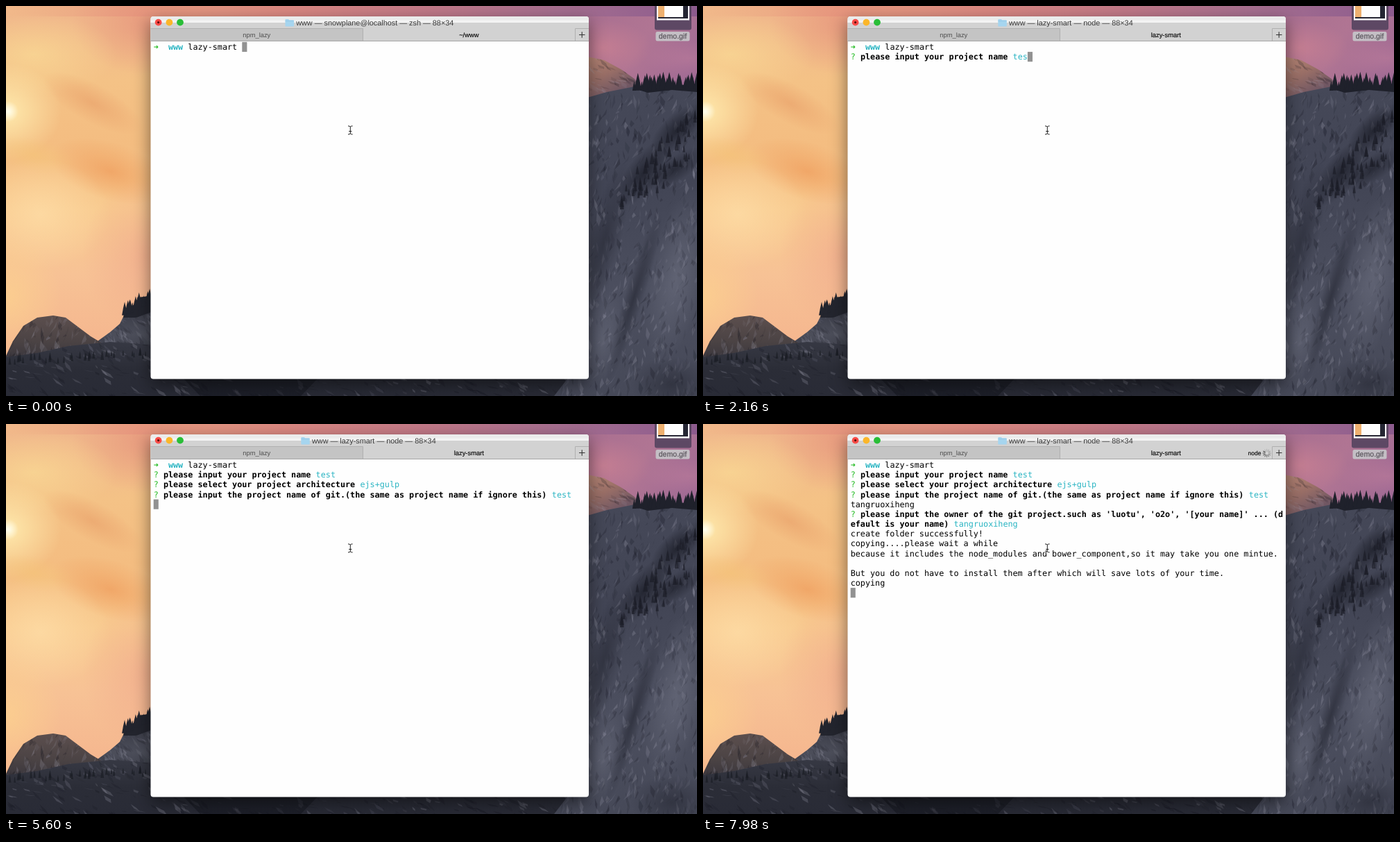
Animation, 996 px wide and 562 px high, one loop 8 s. Source, as an HTML page with a canvas:

```html
<!DOCTYPE html>
<html lang="en">
<head>
<meta charset="utf-8">
<title>Terminal session</title>
<style>
  html, body { margin: 0; width: 100%; height: 100%; overflow: hidden; background: #2b2d38; }
  canvas, svg { position: absolute; left: 0; top: 0; width: 996px; height: 562px; display: block; }
  text { white-space: pre; text-rendering: geometricPrecision; }
  .ui { font-family: "Liberation Sans", Arial, sans-serif; }
  .title { font-size: 10.85px; fill: #3c3c3c; }
  .tab { font-size: 9.35px; text-anchor: middle; }
  .active { fill: #111; stroke: #111; stroke-width: .2px; }
  #term { font: 11.774px "DejaVu Sans Mono", "DejaVu Sans", monospace; fill: #000; }
  #term .b { font-weight: bold; }
  #term .g { fill: #25bc24; }
  #term .c { fill: #2bb5c3; }
  #term .d { fill: #a2a2a2; }
  .shadow { filter: drop-shadow(0 8px 12px rgba(0, 0, 0, .5)); }
</style>
</head>
<body>
<canvas id="wall" width="996" height="562"></canvas>
<svg id="stage" viewBox="0 0 996 562">
  <defs>
    <clipPath id="frame"><rect x="208.5" y="15" width="631.5" height="522.5" rx="4"/></clipPath>
    <g id="folder" fill="#a6d5ef">
      <path d="M0 1.5q0-1 1-1h3.6l1.2 1.3h5.7q1 0 1 1V10q0 1-1 1H1q-1 0-1-1z"/>
      <path d="M0 3.2h12.5" stroke="#8fc5e4" stroke-width=".7"/>
    </g>
    <path id="beam" d="M493.4 172.9q2.2 0 2.9 1.2.7-1.2 2.9-1.2M493.4 185q2.2 0 2.9-1.2.7 1.2 2.9 1.2M496.3 174v9.8M494.6 180.6h3.4" fill="none" stroke-linecap="round"/>
  </defs>

  <!-- desktop icon -->
  <rect x="935" y="-8" width="53" height="42.5" rx="3" fill="#5d4864"/>
  <rect x="938" y="-4" width="47" height="24.5" fill="#fff"/>
  <rect x="940" y="-4" width="43" height="22" fill="#252633"/>
  <path d="M940-4h9v20h-9z" fill="#eeb06f"/>
  <path d="M949-4h27v20h-27z" fill="#fdfdfd"/>
  <rect x="936.5" y="37" width="49" height="13.5" rx="2.5" fill="#c4bfc5"/>
  <text class="ui" x="961" y="47.3" text-anchor="middle" font-size="10.6" fill="#5f5a61" stroke="#5f5a61" stroke-width=".25">demo.gif</text>

  <!-- window -->
  <rect class="shadow" x="208.5" y="15" width="631.5" height="522.5" rx="4" fill="#fefefe"/>
  <g clip-path="url(#frame)">
    <path d="M208 15h632v9H208z" fill="#ebebeb"/>
    <path d="M208 20.5h632V24H208z" fill="#f3f3f3"/>
    <path d="M208 24h632v27H208z" fill="#d2d2d2"/>
    <path d="M208 32h306.5v18.5H208z" fill="#c4c4c4"/>
    <path d="M208 32.5h306.5v18M820.5 32.5v18M820.5 32.5h20" fill="none" stroke="#b0b0b0"/>
    <path d="M208 50.5h632" stroke="#a6a6a6"/>
  </g>
  <path d="M826 41.5h8.5M830.2 37.3v8.5" stroke="#333" stroke-width="1.1"/>
  <circle cx="219.6" cy="23.6" r="4.9" fill="#f94b47"/>
  <circle cx="235.4" cy="23.6" r="4.9" fill="#fbb62a"/>
  <circle cx="251" cy="23.6" r="4.9" fill="#29be37"/>
  <circle cx="219.6" cy="23.6" r="1.6" fill="#5a0c0b"/>
  <text class="ui tab" x="361.3" y="45" fill="#4f4f4f">npm_lazy</text>
  <g id="chrome"></g>
  <g id="term"></g>
  <g id="spinner" transform="translate(812.7 42)"></g>

  <!-- pointer -->
  <use href="#beam" stroke="#fff" stroke-width="2.4"/>
  <use href="#beam" stroke="#1c1c1c"/>
</svg>

<script>
const LOOP = 8000, COL = 7.0885, ROW = 14.17, LEFT = 212.7, TOP = 51.9;
const USER = 'tangruoxiheng';
const $ = id => document.getElementById(id);
const timed = [];

function add(parent, tag, attrs, text = '') {
  const el = document.createElementNS('http://www.w3.org/2000/svg', tag);
  for (const key in attrs) el.setAttribute(key, attrs[key]);
  el.textContent = text;
  parent.appendChild(el);
  return el;
}

function during(el, from, to = LOOP) {
  timed.push({ el, from, to });
  return el;
}

// --- window title and tabs ---
function title(x, text, from, to) {
  const g = during(add($('chrome'), 'g', {}), from, to);
  add(g, 'use', { href: '#folder', x, y: 18.5 });
  add(g, 'text', { class: 'ui title', x: x + 15.7, y: 27.5 }, text);
}
function tab(text, from, to) {
  during(add($('chrome'), 'text', { class: 'ui tab active', x: 667.3, y: 45 }, text), from, to);
}
title(402.5, 'www — snowplane@localhost — zsh — 88×34', 0, 600);
title(428.6, 'www — lazy-smart — env — 88×34', 600, 810);
title(425.3, 'www — lazy-smart — node — 88×34', 810);
tab('~/www', 0, 600);
tab('lazy-smart', 600);
during(add($('chrome'), 'text', { class: 'ui active', x: 785.6, y: 45, 'font-size': 8.5 }, 'node'), 7390);

// --- terminal text ---
function line(row, col, from, to, ...parts) {
  for (const [cls, text] of parts) {
    const attrs = { class: cls, x: LEFT + col * COL, y: TOP + row * ROW + 11.1 };
    during(add($('term'), 'text', attrs, text), from, to);
    col += text.length;
  }
}
function caret(row, col, from, to) {
  const attrs = { x: LEFT + col * COL, y: TOP + row * ROW, width: COL, height: ROW, fill: '#929292' };
  during(add($('term'), 'rect', attrs), from, to);
}
const ask = (row, from, text) => line(row, 0, from, LOOP, ['g', '? '], ['b', text]);

line(0, 0, 0, LOOP, ['g b', '➜'], ['', '  '], ['c b', 'www'], ['', ' '], ['', 'lazy-smart']);
caret(0, 18, 0, 600);
caret(1, 0, 600, 1110);

ask(1, 1110, 'please input your project name');
const keys = [1110, 1710, 1860, 2160, 2310, 2750];
[...'test'].forEach((ch, i) => line(1, 33 + i, keys[i + 1], LOOP, ['c', ch]));
for (let i = 0; i < 5; i++) caret(1, 33 + i, keys[i], keys[i + 1]);

ask(2, 2750, 'please select your project architecture');
line(2, 42, 2750, 4250, ['d', '(Use arrow keys)']);
line(3, 0, 2750, 4250, ['c', '❯ '], ['c', 'ejs+gulp']);
line(4, 2, 2750, 4250, ['', 'ejs+webpack']);
line(2, 42, 4250, LOOP, ['c', 'ejs+gulp']);

ask(3, 4250, 'please input the project name of git.(the same as project name if ignore this)');
line(3, 81, 4250, 5600, ['d', '(test)']);
caret(5, 1, 4250, 5600);
line(3, 81, 5600, LOOP, ['c', 'test']);
caret(4, 0, 5600, 5750);

line(4, 0, 5750, LOOP, ['', USER]);
ask(5, 5750, "please input the owner of the git project.such as 'luotu', 'o2o', '[your name]' ... (d");
line(6, 0, 5750, LOOP, ['b', 'efault is your name)']);
line(6, 21, 5750, 6940, ['d', `(${USER})`]);
caret(6, 37, 5750, 6940);

line(6, 21, 6940, LOOP, ['c', USER]);
[
  'create folder successfully!',
  'copying....please wait a while',
  'because it includes the node_modules and bower_component,so it may take you one mintue.',
  '',
  'But you do not have to install them after which will save lots of your time.',
  'copying'
].forEach((text, i) => line(7 + i, 0, 6940, LOOP, ['', text]));
caret(13, 0, 6940, LOOP);

// --- busy spinner ---
during($('spinner'), 7390);
const spokes = Array.from({ length: 12 }, (_, i) => add($('spinner'), 'path', {
  d: 'M0-2.9V-5.6', transform: `rotate(${i * 30})`, stroke: '#333', 'stroke-width': 1.1, 'stroke-linecap': 'round'
}));
const spinTimes = [7390, 7540, 7690, 7830, 7980];

// --- wallpaper ---
const ctx = $('wall').getContext('2d');
let seed = 11;
function rand(a = 0, b = 1) {
  seed = (seed * 1664525 + 1013904223) >>> 0;
  return a + (b - a) * seed / 4294967296;
}
function shape(points, fill) {
  ctx.beginPath();
  for (let i = 0; i < points.length; i += 2) ctx.lineTo(points[i], points[i + 1]);
  ctx.closePath();
  ctx.fillStyle = fill;
  ctx.fill();
}
function fade(x0, y0, x1, y1, ...colors) {
  const g = ctx.createLinearGradient(x0, y0, x1, y1);
  colors.forEach((c, i) => g.addColorStop(i / (colors.length - 1), c));
  return g;
}
function glow(x, y, rx, ry, rgb, alpha, turn = 0) {
  ctx.save();
  ctx.translate(x, y);
  ctx.rotate(turn);
  ctx.scale(rx, ry);
  const g = ctx.createRadialGradient(0, 0, 0, 0, 0, 1);
  g.addColorStop(0, `rgba(${rgb},${alpha})`);
  g.addColorStop(1, `rgba(${rgb},0)`);
  ctx.fillStyle = g;
  ctx.fillRect(-1, -1, 2, 2);
  ctx.restore();
}
// Rock face: a filled outline with faint random facets, leaning one way.
function rock(points, fill, count, lean) {
  ctx.save();
  shape(points, fill);
  ctx.clip();
  const xs = points.filter((_, i) => i % 2 === 0), ys = points.filter((_, i) => i % 2);
  const x0 = Math.min(...xs), x1 = Math.max(...xs), y0 = Math.min(...ys), y1 = Math.max(...ys);
  for (let i = 0; i < count; i++) {
    const x = rand(x0, x1), y = rand(y0, y1), len = rand(5, 22), wide = rand(1, 5);
    const turn = lean + rand(-.5, .5), dx = Math.cos(turn) * len, dy = Math.sin(turn) * len;
    const tone = rand() < .55 ? '14,15,24' : '165,165,182';
    shape([x, y, x + dx * .5 + wide, y + dy * .5, x + dx, y + dy, x + dx * .4 - wide * .4, y + dy * .6],
      `rgba(${tone},${rand(.06, .26)})`);
  }
  ctx.restore();
}
function trees(x0, y0, x1, y1, count, size, color, spread = 1) {
  for (let i = 0; i < count; i++) {
    const k = i / (count - 1), h = size * rand(.5, 1.3), w = h * .24;
    const x = x0 + (x1 - x0) * k + rand(-2, 2) * spread, y = y0 + (y1 - y0) * k + rand(-1, 1) * spread;
    shape([x - w, y + 3, x - w * .5, y - h * .5, x, y - h, x + w * .5, y - h * .5, x + w, y + 3], color);
  }
}

function paintSky() {
  ctx.fillStyle = fade(0, 0, 996, 0, '#f1b98a', '#e99f82', '#dc8982', '#c37a88', '#a66f90', '#8c5b8d');
  ctx.fillRect(0, 0, 996, 562);
  ctx.fillStyle = fade(0, 15, 0, 480, '#f0b78b', '#f4c286', '#f4bd81', '#f8ca8f', '#f7c295', '#f5b78f');
  ctx.fillRect(0, 15, 209, 547);
  glow(205, 25, 110, 75, '228,142,122', .7);
  glow(40, 70, 120, 60, '249,215,148', .8);
  glow(0, 152, 80, 70, '255,236,175', .95);
  glow(3, 152, 15, 15, '255,255,240', 1);
  glow(125, 140, 80, 28, '232,158,104', .6, .5);
  glow(150, 238, 90, 42, '239,158,94', .75, .3);
  glow(40, 215, 60, 25, '244,196,120', .6, .2);
  glow(50, 300, 100, 80, '253,218,163', .9);
  glow(200, 360, 90, 110, '240,168,140', .65);
  glow(0, 420, 80, 90, '252,209,143', .8);
  ctx.fillStyle = fade(840, 0, 996, 100, '#a96f90', '#b07593', '#a06a94');
  ctx.fillRect(840, 15, 156, 130);
  glow(860, 60, 70, 40, '205,130,146', .7);
  glow(985, 75, 70, 25, '190,125,155', .5);
}

function paintLeft() {
  const dark = '#23252e';
  rock([125, 488, 150, 470, 164, 458, 172, 442, 190, 430, 212, 424, 212, 520, 125, 520],
    fade(0, 430, 0, 515, '#343641', '#4c4e5a', '#3a3c47'), 110, .9);
  shape([169, 449, 172, 436, 184, 431, 191, 420, 212, 417, 212, 440, 188, 449], dark);
  trees(171, 443, 209, 425, 18, 15, dark);
  rock([0, 504, 10, 483, 25, 461, 45, 449, 68, 446, 86, 449, 102, 461, 122, 476, 142, 488, 150, 520, 0, 530],
    fade(0, 446, 0, 520, '#5c4f4e', '#4b4344', '#33313a'), 190, 1.9);
  rock([0, 506, 45, 500, 90, 490, 150, 484, 209, 488, 250, 530, 996, 530, 996, 562, 0, 562],
    fade(0, 485, 0, 562, '#363843', '#2b2d37', '#292b36'), 620, .5);
  trees(2, 512, 205, 502, 35, 8, 'rgba(26,28,36,.7)', 4);
  shape([255, 536, 450, 536, 425, 562, 280, 562], 'rgba(18,20,28,.5)');
}

function paintRight() {
  const dark = '#1f212b', soft = 'rgba(27,29,39,.7)';
  rock([838, 73, 862, 78, 886, 91, 906, 105, 914, 118, 880, 127, 838, 134],
    fade(840, 75, 870, 130, '#b78676', '#9a6f67', '#705763'), 60, .6);
  rock([838, 132, 866, 124, 906, 116, 935, 113, 996, 114, 996, 562, 790, 562, 838, 500],
    fade(850, 120, 900, 560, '#454858', '#424555', '#4c4f5f', '#464958'), 900, 1.8);
  shape([906, 119, 925, 112, 960, 115, 996, 112, 996, 124, 960, 121, 925, 125], dark);
  trees(908, 119, 994, 116, 32, 18, dark, 1.5);
  glow(968, 178, 50, 22, '25,27,37', .8, -.75);
  glow(920, 240, 60, 24, '25,27,37', .75, -.9);
  glow(965, 235, 50, 18, '25,27,37', .6, -.6);
  trees(990, 160, 890, 285, 45, 11, soft, 7);
  trees(994, 205, 915, 275, 25, 10, soft, 6);
  glow(862, 340, 24, 120, '26,28,38', .45, .25);
  glow(905, 420, 14, 130, '24,26,36', .5, .3);
  glow(966, 390, 40, 130, '126,129,146', .4, .2);
  glow(860, 480, 28, 70, '122,125,141', .4, .2);
  glow(960, 545, 60, 40, '26,28,38', .45);
}

paintSky();
paintLeft();
paintRight();

// --- playback ---
function draw() {
  const t = performance.now() % LOOP;
  for (const { el, from, to } of timed) {
    el.style.display = t >= from && t < to ? '' : 'none';
  }
  const step = spinTimes.filter(s => s <= t).length * 2;
  spokes.forEach((el, i) => {
    const age = (step - i + 24) % 12;
    el.setAttribute('stroke-opacity', Math.max(.18, .9 - age * .075));
  });
  requestAnimationFrame(draw);
}
draw();
</script>
</body>
</html>
```
